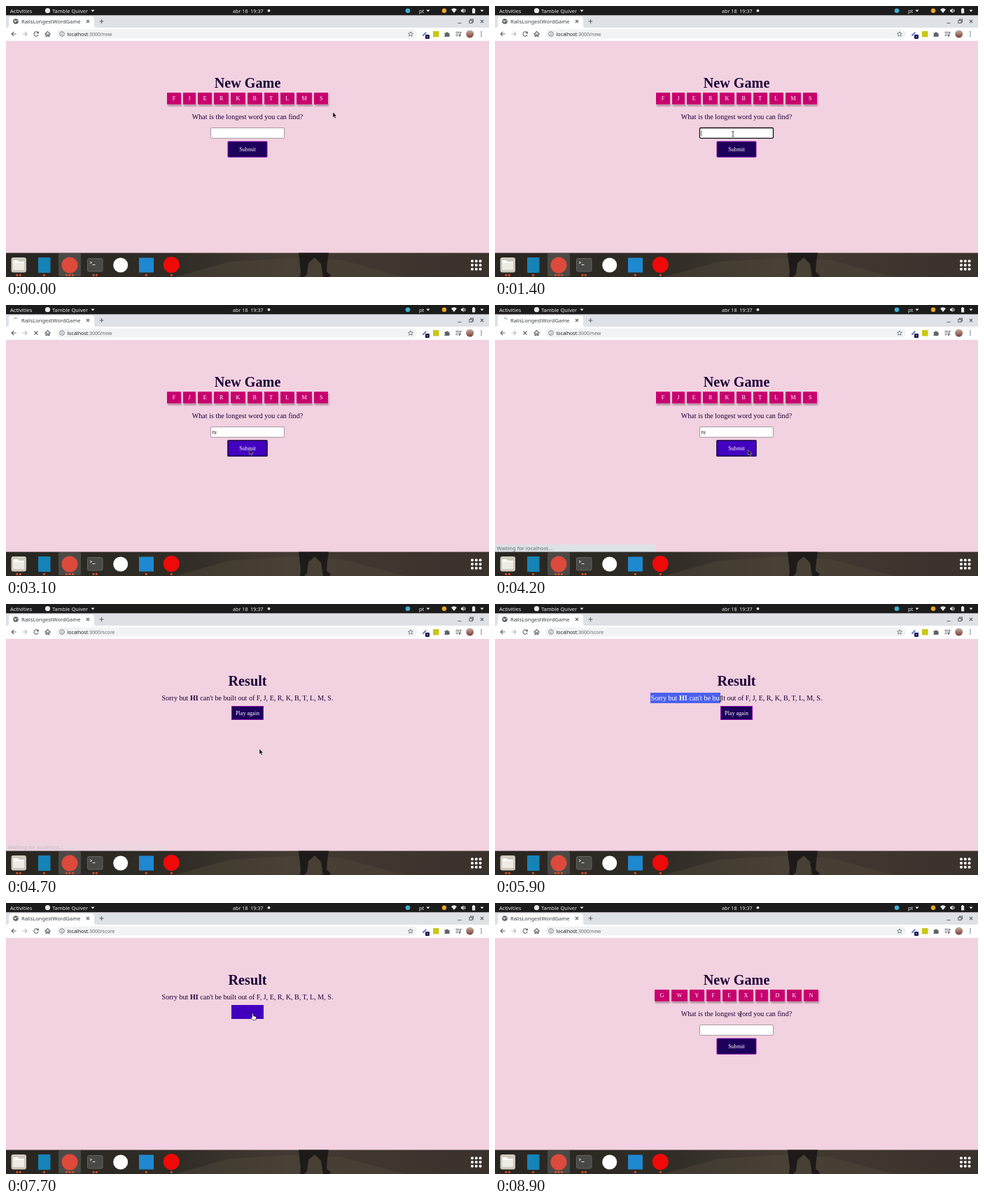
An HTML page that plays this animation: 690x388 px, repeating every 9100 ms.

```html
<!DOCTYPE html>
<html lang="en">
<head>
<meta charset="utf-8">
<title>Longest word game</title>
<style>
  html, body { margin: 0; width: 100%; height: 100%; overflow: hidden; background: #f2d1e0; }
  svg, #tiles { position: absolute; left: 0; top: 0; }
  text { font: 7.5px "Noto Sans", "Open Sans", sans-serif; white-space: pre; }
  .page text, #tiles { font-family: "Liberation Serif", "Times New Roman", serif; }
  .page text { fill: #1d0038; text-anchor: middle; }
  .page .title { font-size: 20.2px; font-weight: bold; }
  .page .body { font-size: 10.1px; }
  .page .label { font-size: 8.08px; fill: #fff; }
  .page .field { font: 6.9px "Noto Sans", sans-serif; fill: #111; text-anchor: start; }
  .button { fill: #1d005b; stroke: #850ca8; }
  .button.hover { fill: #4300bf; stroke: #4300bf; }
  .button.pressed { fill: #4300bf; stroke: #14003c; stroke-width: 1.6; }
  .line { fill: none; stroke: #5f6368; stroke-width: 1.1; }
  .bar { fill: #e8e8e8; }
  #tiles { top: 124px; width: 690px; display: flex; justify-content: center; gap: 3.1px; font-size: 8.08px; }
  #tiles span {
    padding: 0 7.57px; line-height: 17px; color: #fff; background: #c8006f;
    box-shadow: 0 0 0 .6px #f7dfeb, .5px 1.5px 2px #8a6f7e;
  }
</style>
</head>
<body>
<svg width="690" height="388" viewBox="0 0 690 388">
  <defs>
    <linearGradient id="floor">
      <stop offset="0" stop-color="#292622"/><stop offset=".35" stop-color="#2f2c25"/>
      <stop offset=".58" stop-color="#433b32"/><stop offset="1" stop-color="#39312b"/>
    </linearGradient>
    <linearGradient id="photo" x2="0" y2="1">
      <stop offset="0" stop-color="#c9b3a4"/><stop offset="1" stop-color="#7a3b35"/>
    </linearGradient>
    <clipPath id="picked"><rect id="clip" x="222" y="127" width="0" height="15"/></clipPath>
  </defs>

  <!-- system bar -->
  <rect width="690" height="13.5" fill="#1d1c1c"/>
  <g class="bar">
    <text x="6" y="9.5">Activities</text>
    <circle cx="59.5" cy="6.7" r="3.6"/>
    <text x="66" y="9.5">Tamble Quiver</text>
    <path d="M121.500 5.500h5l-2.500 3zM600.500 5.500h5l-2.500 3zM677.500 5.500h5l-2.500 3z"/>
    <text x="324" y="9.500" style="font-size:7.2px">abr 18  19:37</text>
    <circle cx="375.500" cy="6.700" r="1.900"/>
    <text x="590" y="9.500">pt</text>
    <path d="M636 5q4-3.500 8 0l-4 5zM650 5.200h1.700l2-2v7l-2-2H650z"/>
    <path d="M655 4.500q1.800 2.200 0 4.400" class="line" style="stroke:#e8e8e8"/>
    <path d="M666 4h1.200V3h1.800v1h1.200v6.500H666z"/>
  </g>
  <circle cx="574" cy="6.700" r="3.300" fill="#3bb1d4"/>
  <circle cx="626" cy="6.700" r="3.200" fill="#f0a81e"/>

  <!-- browser window -->
  <rect y="13.500" width="690" height="18" fill="#dee1e6"/>
  <path d="M0 31.500q4 0 4-4V19q0-4 4-4H122q4 0 4 4v8.500q0 4 4 4V50H0z" fill="#fff"/>
  <rect y="31" width="690" height="19" fill="#fff"/>
  <rect x="72" y="33.500" width="515" height="13" rx="6.500" fill="#f1f3f4"/>
  <g id="globe">
    <circle cx="14" cy="22" r="3.800" fill="#5f6368"/>
    <path d="M11.500 20.500l2 .3 1 1.500-1.500 1.500zM15 19.500l2 2-1.500.5z" fill="#fff"/>
  </g>
  <path id="spinner" class="line" d="M10.500 22a3.500 3.500 0 0 1 3.500-3.500" style="stroke:#a5a8ac"/>
  <text x="22" y="24.700" fill="#3c4043">RailsLongestWordGame</text>
  <path class="line" d="M115 20l4 4m0-4l-4 4M136.500 19v6m-3-3h6M645.500 24.500h5M662 20.500h4v4h-4zM663.500 20.500v-1.500h4v4h-1.500M678 20l4 4m0-4l-4 4"/>
  <path class="line" d="M14.500 40h-6.500m3-3l-3 3 3 3"/>
  <path class="line" d="M23.500 40h6.500m-3-3l3 3-3 3" style="stroke:#b9bbbe"/>
  <path id="reload" class="line" d="M46 38.500a3.200 3.200 0 1 0 .2 2.600M46.300 36.500v2.500h-2.500"/>
  <path id="stop" class="line" d="M40.500 37.500l5 5m0-5l-5 5"/>
  <path class="line" d="M55.500 40.500l4-4 4 4M57 39.500v4h1.700v-2.500h1.700v2.500H62v-4"/>
  <circle class="line" cx="80" cy="40" r="3.300" style="stroke-width:.8"/>
  <path class="line" d="M80 39.500v2.300m0-3.900v.8" style="stroke-width:.9"/>
  <text x="87.500" y="42.500" fill="#202124" style="font-size:7px">localhost<tspan id="path" fill="#666a6e"></tspan></text>
  <path class="line" d="M578 36.800l1 2.200 2.400.2-1.800 1.600.6 2.400-2.200-1.300-2.200 1.300.6-2.400-1.800-1.600 2.400-.2z" style="stroke-width:.8"/>
  <path d="M595 41.500l4.500-4.500 1.500 1.500-4.500 4.500h-1.500z" fill="#6d7fc4"/>
  <rect x="599" y="41" width="6" height="6" rx="1" fill="#191553"/>
  <path d="M601 44h2" stroke="#fff" stroke-width=".8"/>
  <rect x="610" y="36" width="8.500" height="8.500" fill="#c9c814"/>
  <path d="M626.500 38.500h2.200a1.300 1.300 0 0 1 2.600 0h2v2a1.300 1.300 0 0 1 0 2.300v1.200h-6.800v-1.700a1.300 1.300 0 0 0 0-2.200z" fill="#5f6368"/>
  <path class="line" d="M642.500 37.500h5m-5 2.500h5m-5 2.500h3M649 42v-4.500h1.800"/>
  <circle cx="648" cy="42.500" r="1.300" fill="#5f6368"/>
  <circle cx="662.700" cy="40" r="5.500" fill="url(#photo)"/>
  <path d="M679 36.500v1.400m0 1.400v1.400m0 1.400v1.400" stroke="#5f6368" stroke-width="1.500"/>

  <!-- page -->
  <rect y="50" width="690" height="304" fill="#f2d1e0"/>
  <g id="game" class="page">
    <text class="title" x="345" y="117.300">New Game</text>
    <text class="body" x="345" y="162">What is the longest word you can find?</text>
    <rect id="box" x="292.500" y="174.500" width="105" height="14.800" rx="1.500" fill="#fff"/>
    <text id="typed" class="field" x="294.700" y="184.500"></text>
    <path id="caret" stroke="#000" stroke-width=".6"/>
    <rect id="submit" x="317" y="194" width="56" height="22.300" rx=".8"/>
    <text class="label" x="345" y="207.700">Submit</text>
    <g id="hint">
      <rect x="292.500" y="190.500" width="105.500" height="26.300" rx="1" fill="#c9aebb"/>
      <rect x="292.800" y="190" width="104.700" height="25.800" fill="#fff"/>
      <path d="M317 216.300h56" stroke="#850ca8"/>
      <text class="field" x="298.500" y="206" style="font-size:7.500px;font-weight:600">hi</text>
    </g>
  </g>
  <g id="result" class="page">
    <text class="title" x="345" y="117.300">Result</text>
    <text class="body" id="verdict" x="345" y="138">Sorry but <tspan font-weight="bold">HI</tspan> can't be built out of F, J, E, R, K, B, T, L, M, S.</text>
    <g clip-path="url(#picked)">
      <rect x="222" y="127" width="246" height="15" fill="#4c60ee"/>
      <text class="body" x="345" y="138" style="fill:#fff">Sorry but <tspan font-weight="bold">HI</tspan> can't be built out of F, J, E, R, K, B, T, L, M, S.</text>
    </g>
    <rect id="again" x="322.500" y="146.500" width="45" height="19"/>
    <text id="againLabel" class="label" x="345" y="158.700">Play again</text>
  </g>
  <g id="status">
    <path d="M0 342.500h227q3 0 3 3v8.500H0z" fill="#dee1e6"/>
    <text x="2.500" y="351" fill="#6a6d71" style="font-size:7.600px">Waiting for localhost...</text>
  </g>

  <!-- dock -->
  <rect y="353.500" width="690" height="34.500" fill="url(#floor)"/>
  <path d="M240 388l80-22 100-6 60 4 90 24z" fill="#51473a" opacity=".45"/>
  <path d="M418 353.500h43l-2 14-1 13 6 5-2 2.500h-9l-3-19-9-9-9 8-2 16-4 4h-6l1-8z" fill="#1d1a19"/>
  <rect x="75" y="354" width="32" height="33" rx="2" fill="#4b4945"/>
  <rect x="7.500" y="360" width="21.500" height="21.500" rx="3" fill="#cfc9be"/>
  <path d="M10.500 364h6l1.500 2h8v11.500H10.500z" fill="#fff"/>
  <path d="M10.500 368h15.500v9.500H10.500z" fill="#eeebe5"/>
  <rect x="46" y="360" width="17.500" height="22" rx="1" fill="#1683b7"/>
  <circle cx="91" cy="371" r="11.500" fill="#dd4a3c"/>
  <rect x="116.500" y="361.500" width="21.500" height="18.500" rx="2" fill="#494945" stroke="#66645f"/>
  <text x="119.500" y="370" fill="#fff" style="font:bold 6.500px 'Noto Sans Mono',monospace">&gt;_</text>
  <circle cx="163.700" cy="371" r="10.500" fill="#fff"/>
  <rect x="190" y="360.500" width="21" height="21" fill="#1e88d0"/>
  <circle cx="236.300" cy="370.500" r="11.500" fill="#f00909"/>
  <g id="dots" fill="#e8542a"></g>
  <g id="grid" fill="#fff"></g>
</svg>
<div id="tiles"></div>
<svg width="690" height="388" viewBox="0 0 690 388">
  <g id="cursor">
    <path id="arrow" d="M0 0V7.600L1.700 6.100 3 8.900 4.300 8.300 3.100 5.600H5.300z" fill="#111" stroke="#fff" stroke-width=".4"/>
    <path id="beam" d="M-1.600-3.500q1.600 0 1.600.8 0-.8 1.600-.8M0-3v6.500M-1.600 4q1.600 0 1.600-.8 0 .8 1.600.8" fill="none" stroke="#222" stroke-width=".8"/>
    <path id="hand" d="M0 0q.9-.8 1.600 0V3.200l3.300.8q1.200.4 1 1.700l-.6 3.300H.8L-1.800 5.800q.5-1 1.800 0z" fill="#fff" stroke="#111" stroke-width=".6"/>
  </g>
</svg>
<script>
const LOOP = 9100;
const $ = id => document.getElementById(id);
const show = (id, on) => { $(id).style.display = on ? "" : "none"; };
const circle = (x, y, r) => `<circle cx="${x}" cy="${y}" r="${r}"/>`;

$("dots").innerHTML = [15.8, 20.3, 54.5, 86.5, 91, 95.5, 125, 129.3, 200.3, 236.3]
  .map(x => circle(x, 385.3, 1.5)).join("");
$("grid").innerHTML = Array.from({ length: 9 }, (_, i) =>
  circle(666 + i % 3 * 5.8, 365.2 + Math.floor(i / 3) * 5.8, 2)).join("");

// pointer stops: time, x, y
const route = [
  [0, 467, 152], [200, 467, 152], [1000, 341, 182], [1200, 340, 183], [2400, 340, 183],
  [2800, 347.5, 206.5], [3300, 347.5, 206.5], [4300, 362, 207.5], [4900, 362, 207.5],
  [5400, 223, 135], [5600, 223, 135], [6300, 474.5, 136.5], [6900, 474.5, 136.5],
  [7500, 351.5, 158.5], [8300, 351.5, 158.5], [8600, 351, 159], [LOOP, 351, 159]
];
// pointer shapes from a given time
const shapes = [[0, "arrow"], [1000, "beam"], [2500, "arrow"], [5400, "beam"],
  [6300, "arrow"], [7400, "hand"], [8300, "beam"]];

function pointer(t) {
  const i = route.findIndex(stop => stop[0] > t);
  const [t0, x0, y0] = route[i - 1], [t1, x1, y1] = route[i];
  const p = (t - t0) / (t1 - t0), e = p * p * (3 - 2 * p);
  return [x0 + (x1 - x0) * e, y0 + (y1 - y0) * e];
}

let letters = "";
function setTiles(next) {
  if (next === letters) return;
  letters = next;
  $("tiles").innerHTML = [...next].map(c => `<span>${c}</span>`).join("");
}

function draw(t) {
  const within = (a, b) => t >= a && t < b;
  const [x, y] = pointer(t);
  const result = within(4400, 8300), focus = within(1200, 3000);
  const loading = within(3000, 4400);

  show("game", !result);
  show("result", result);
  show("tiles", !result);
  setTiles(t < 8300 ? "FJERKBTLMS" : "GWYFEXIDKN");
  $("path").textContent = ":3000/" + (result ? "score" : "new");

  show("globe", !loading);
  show("spinner", loading);
  $("spinner").setAttribute("transform", `rotate(${t * .36} 14 22)`);
  show("stop", loading || within(8000, 8300));
  show("reload", !loading && !within(8000, 8300));

  $("typed").textContent = within(1800, 2200) ? "h" : within(2200, 8300) ? "hi" : "";
  $("box").setAttribute("stroke", focus ? "#101010" : "#85777f");
  $("box").setAttribute("stroke-width", focus ? 1.3 : .7);
  show("caret", focus && t % 1000 < 600);
  const caretX = 295 + (result ? 0 : $("typed").getComputedTextLength());
  $("caret").setAttribute("d", `M${caretX} 178.500v7.500`);
  show("hint", within(2000, 2400));
  $("submit").setAttribute("class", "button" + (loading ? " pressed" : within(2700, 3000) ? " hover" : ""));

  const picked = within(5600, 7200) ? Math.min(x, 468) - 222 : 0;
  $("clip").setAttribute("width", picked);
  const over = t >= 7400;
  $("again").setAttribute("class", "button" + (over ? " hover" : ""));
  $("againLabel").style.fill = over ? "#3b00a9" : "#fff";

  show("status", within(4000, 4900));
  $("status").style.opacity = Math.min(1, Math.max(0, (4800 - t) / 350));

  const shape = shapes.filter(s => s[0] <= t).pop()[1];
  for (const id of ["arrow", "beam", "hand"]) show(id, id === shape);
  $("cursor").setAttribute("transform", `translate(${x} ${y})`);
}

function tick() {
  draw(Math.floor(performance.now() % LOOP / 100) * 100);
  requestAnimationFrame(tick);
}
tick();
</script>
</body>
</html>
```
